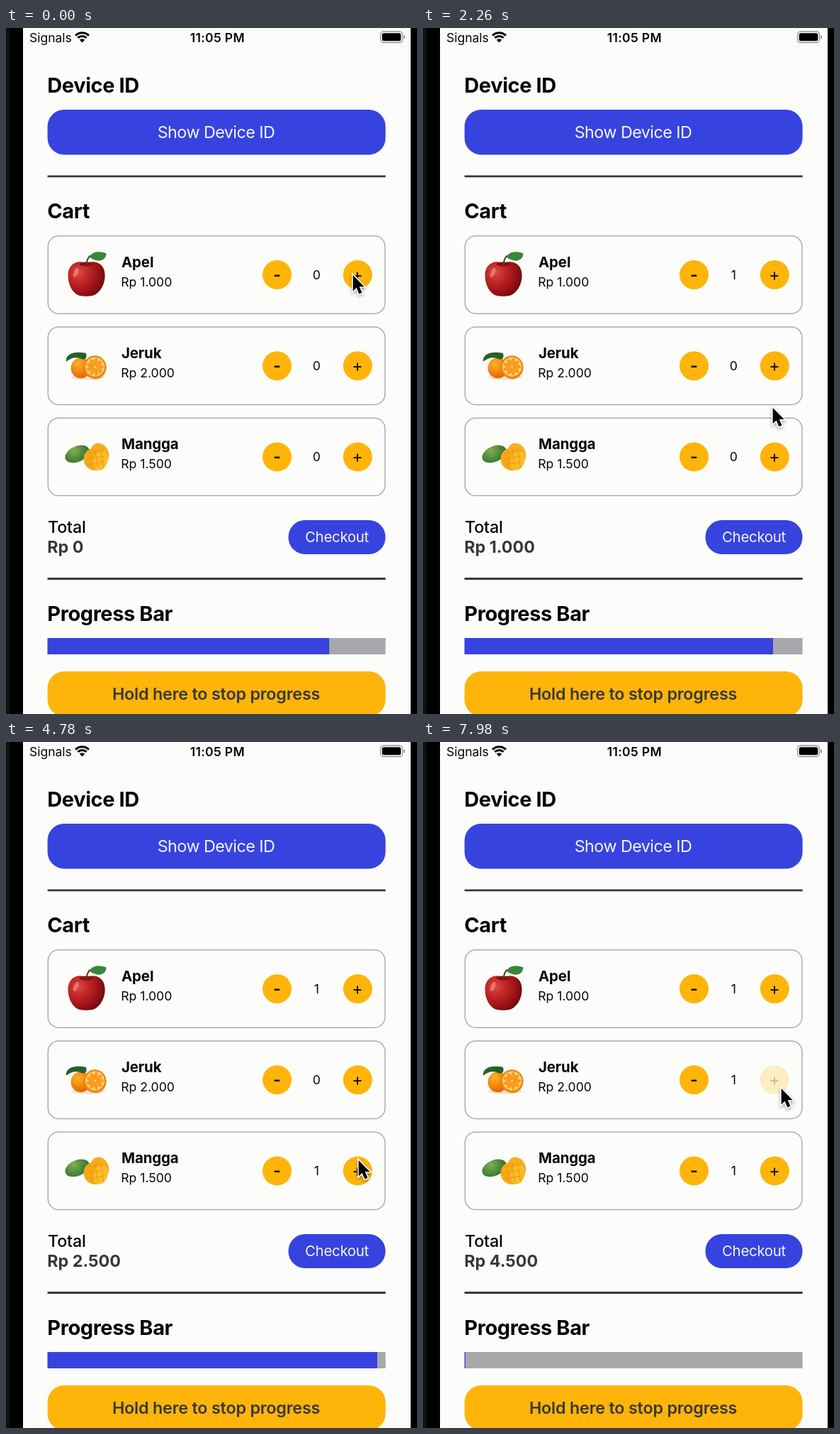
An HTML page with a canvas for the animation above (8000 ms loop, 580 px wide and 966 px high).

```html
<!DOCTYPE html>
<html lang="id">
<head>
<meta charset="utf-8">
<title>Cart demo</title>
<style>
html, body { margin: 0; width: 100%; height: 100%; overflow: hidden; background: #000; }
canvas { display: block; }
</style>
</head>
<body>
<canvas id="stage" width="580" height="966"></canvas>
<script>
const ctx = document.getElementById('stage').getContext('2d');
const LOOP = 8000;
const BLUE = '#3743df', AMBER = '#ffb409', PAPER = '#fcfdfb', INK = '#050505', SLATE = '#37383c';
const LEFT = 58.6, RIGHT = 535.6, WIDTH = RIGHT - LEFT;

const items = [
  { name: 'Apel', price: 1000, art: drawApple },
  { name: 'Jeruk', price: 2000, art: drawOrange },
  { name: 'Mangga', price: 1500, art: drawMango }
];
const ROW_TOP = 292.5, ROW_STEP = 128.2;

// Taps on the plus buttons, times in ms
const taps = [
  { row: 0, down: 300, up: 460 },
  { row: 2, down: 3640, up: 3800 },
  { row: 1, down: 7700, up: 7955 }
];

// Pointer tracks: [time, value]
const trackX = [[0, 488], [1520, 490], [2260, 492], [3340, 495], [4780, 496], [5700, 496], [6560, 505], [6854, 504]];
const trackY = [[0, 345], [1520, 343], [1650, 343], [2555, 594], [3340, 594], [4780, 586], [5700, 586], [6854, 485]];

const clamp = v => Math.max(0, Math.min(1, v));
const smooth = v => v * v * (3 - 2 * v);
const rupiah = n => 'Rp ' + String(n).replace(/\B(?=(\d{3})+$)/g, '.');

function along(track, t) {
  for (let i = 1; i < track.length; i++) {
    const [t0, a] = track[i - 1], [t1, b] = track[i];
    if (t < t1) return a + (b - a) * smooth(clamp((t - t0) / (t1 - t0)));
  }
  return track[track.length - 1][1];
}

// cubic-bezier(.42, 0, 1, 1)
function easeIn(x) {
  let lo = 0, hi = 1;
  for (let i = 0; i < 30; i++) {
    const s = (lo + hi) / 2;
    const bx = 1.26 * s * (1 - s) ** 2 + 3 * s * s - 2 * s ** 3;
    if (bx < x) lo = s; else hi = s;
  }
  return lo * lo * (3 - 2 * lo);
}

const easeInOut = x => x < 0.5 ? easeIn(2 * x) / 2 : 1 - easeIn(2 - 2 * x) / 2;

function progress(t) {
  return easeInOut((0.7417 + t / 28000) % 1);
}

function plusAlpha(row, t) {
  const tap = taps.find(p => p.row === row);
  if (t < tap.down) return 1;
  if (t < tap.up) return 1 - 0.8 * smooth(clamp((t - tap.down) / 150));
  return 0.2 + 0.8 * smooth(clamp((t - tap.up) / 250));
}

function text(str, x, y, size, weight = 400, color = INK, spacing = 0, align = 'left') {
  ctx.font = `${weight} ${size}px Inter, Roboto, sans-serif`;
  ctx.letterSpacing = spacing * size + 'px';
  ctx.textAlign = align;
  ctx.fillStyle = color;
  ctx.fillText(str, x, y);
}

const heading = (str, y) => text(str, 58.3, y, 29, 700, INK, -0.014);

function box(x, y, w, h, r, color) {
  ctx.fillStyle = color;
  ctx.beginPath();
  ctx.roundRect(x, y, w, h, r);
  ctx.fill();
}

function oval(x, y, rx, ry, color, turn = 0) {
  ctx.fillStyle = color;
  ctx.beginPath();
  ctx.ellipse(x, y, rx, ry, turn, 0, Math.PI * 2);
  ctx.fill();
}

function shape(d, color) {
  ctx.fillStyle = color;
  ctx.fill(new Path2D(d));
}

function glow(x, y, r, ...stops) {
  const g = ctx.createRadialGradient(x, y, 0, x, y, r);
  stops.forEach((c, i) => g.addColorStop(i / (stops.length - 1), c));
  return g;
}

// Fruit is drawn relative to the row's top left corner
function drawApple() {
  shape('M55 39 C46 34 29 37 29 56 C29 70 36 82 46 84.5 C51 85.5 58 85.5 63 84.5 C73 82 81 70 81 56 C81 37 64 34 55 39Z',
    glow(44, 52, 42, '#dd4a42', '#c02626', '#9c1217', '#5e080d'));
  oval(55, 40, 10, 3, '#7d1216');
  ctx.strokeStyle = '#583c22';
  ctx.lineWidth = 2;
  ctx.stroke(new Path2D('M55 41 Q55 34 60 28'));
  shape('M59 30 C63 22 73 21 83 25 C82 37 69 38 59 30Z', '#37863a');
  oval(40, 52, 3, 7, 'rgba(255,205,190,.4)', 0.4);
}

function drawOrange() {
  oval(57, 71, 24, 4, 'rgba(180,110,40,.2)');
  oval(47, 58, 14, 14.5, glow(43, 52, 22, '#ffb12f', '#f58a0c', '#d96505'));
  shape('M26 49 C26 38 37 34 54 37 C57 43 53 48 47 45 C38 42 34 44 26 49Z', '#25602b');
  oval(67, 57, 16, 16.5, '#ee850d', -0.25);
  oval(67, 56.5, 13.5, 13.5, '#fdd07a', -0.25);
  for (let i = 0; i < 9; i++) {
    const a = i * Math.PI * 2 / 9;
    oval(67 + 7 * Math.cos(a), 56.5 + 7 * Math.sin(a), 5.6, 2.8, '#f99b1c', a);
  }
}

function drawMango() {
  oval(42, 51, 18, 11, glow(37, 46, 25, '#86ad55', '#4f8a3a', '#2f6429'), -0.4);
  oval(74, 50, 12, 15, '#f7ad1d', -0.5);
  oval(67, 58, 16, 16, '#f6a915');
  oval(75, 60, 10, 14, '#fbbd29', 0.3);
  ctx.strokeStyle = '#e89a12';
  ctx.lineWidth = 1;
  ctx.beginPath();
  for (let i = 0; i < 3; i++) {
    ctx.moveTo(56, 50 + i * 8);
    ctx.lineTo(80, 46 + i * 8);
    ctx.moveTo(59 + i * 8, 44);
    ctx.lineTo(63 + i * 8, 71);
  }
  ctx.stroke();
}

function drawStatus() {
  text('Signals', 33, 19.5, 17.5);
  text('11:05 PM', 298.3, 19.5, 17.5, 600, INK, 0.02, 'center');
  ctx.strokeStyle = INK;
  ctx.lineWidth = 3;
  for (const r of [13.3, 8.6]) {
    ctx.beginPath();
    ctx.arc(107.5, 20, r, -Math.PI * 0.75, -Math.PI * 0.25);
    ctx.stroke();
  }
  ctx.fillStyle = INK;
  ctx.beginPath();
  ctx.moveTo(107.5, 20.5);
  ctx.arc(107.5, 20.5, 5.2, -Math.PI * 0.75, -Math.PI * 0.25);
  ctx.fill();
  ctx.strokeStyle = '#929394';
  ctx.lineWidth = 1.3;
  ctx.beginPath();
  ctx.roundRect(528.5, 5, 31, 15.5, 4.5);
  ctx.stroke();
  box(530.7, 7.2, 26.6, 11.1, 2.5, '#000');
  box(561, 10.3, 1.8, 5, 1, '#929394');
}

function drawRow(i, count, t) {
  const top = ROW_TOP + i * ROW_STEP, item = items[i], mid = top + 55;
  ctx.strokeStyle = '#abadae';
  ctx.lineWidth = 1.5;
  ctx.beginPath();
  ctx.roundRect(LEFT + 0.7, top + 0.3, WIDTH - 1.4, 109.4, 15);
  ctx.stroke();
  ctx.save();
  ctx.translate(LEFT, top);
  item.art();
  ctx.restore();
  text(item.name, 163, top + 44, 20.4, 700, INK, -0.005);
  text(rupiah(item.price), 162.2, top + 71.5, 17.6);
  oval(382.5, mid, 20.5, 20.5, AMBER);
  text('-', 382.5, mid + 8, 23.3, 600, INK, 0, 'center');
  text(String(count), 438.3, mid + 6.2, 17.6, 400, INK, 0, 'center');
  ctx.globalAlpha = plusAlpha(i, t);
  oval(496.3, mid, 20.5, 20.5, AMBER);
  text('+', 496, mid + 8.1, 23.3, 400, INK, 0, 'center');
  ctx.globalAlpha = 1;
}

function drawPointer(x, y) {
  const arrow = new Path2D('M1.6 3 V25.5 L6.6 20.8 L10.3 29.5 L14.4 27.8 L10.7 19.2 H17.6Z');
  ctx.save();
  ctx.translate(x, y);
  ctx.lineJoin = 'miter';
  ctx.strokeStyle = '#fff';
  ctx.lineWidth = 3.2;
  ctx.shadowColor = 'rgba(0,0,0,.35)';
  ctx.shadowBlur = 4;
  ctx.shadowOffsetY = 2;
  ctx.stroke(arrow);
  ctx.shadowColor = 'transparent';
  ctx.fillStyle = '#000';
  ctx.fill(arrow);
  ctx.restore();
}

function draw(t) {
  box(0, 0, 580, 966, 0, '#000');
  box(0, 0, 5, 966, 0, '#10120e');
  box(24, 0, 547, 966, 0, PAPER);
  drawStatus();

  heading('Device ID', 91);
  box(LEFT, 115, WIDTH, 63.5, 23.5, BLUE);
  text('Show Device ID', 296.5, 155, 23.3, 400, '#f4f5fb', -0.023, 'center');
  box(LEFT, 207.4, WIDTH, 2.9, 0, '#303b32');

  heading('Cart', 268);
  const counts = items.map((_, i) => taps.filter(p => p.row === i && t >= p.up).length);
  counts.forEach((n, i) => drawRow(i, n, t));

  const total = counts.reduce((sum, n, i) => sum + n * items[i].price, 0);
  text('Total', 59, 711, 23.3, 500, INK, -0.008);
  text(rupiah(total), 58.2, 739.2, 23.3, 700, SLATE);
  box(398.5, 693, 137, 48, 23.5, BLUE);
  text('Checkout', 467, 724, 20.4, 400, '#f4f5fb', -0.013, 'center');
  box(LEFT, 774, WIDTH, 2.9, 0, '#303b32');

  heading('Progress Bar', 835);
  box(LEFT, 859, WIDTH, 23, 0, '#a7a8ac');
  box(LEFT, 859, WIDTH * progress(t), 23, 0, BLUE);
  box(LEFT, 906, WIDTH, 63.5, 23.5, AMBER);
  text('Hold here to stop progress', 296.5, 945.5, 23.3, 600, SLATE, -0.008, 'center');

  drawPointer(along(trackX, t), along(trackY, t));
}

const start = performance.now();
function tick() {
  draw((performance.now() - start) % LOOP);
  requestAnimationFrame(tick);
}
tick();
</script>
</body>
</html>
```
